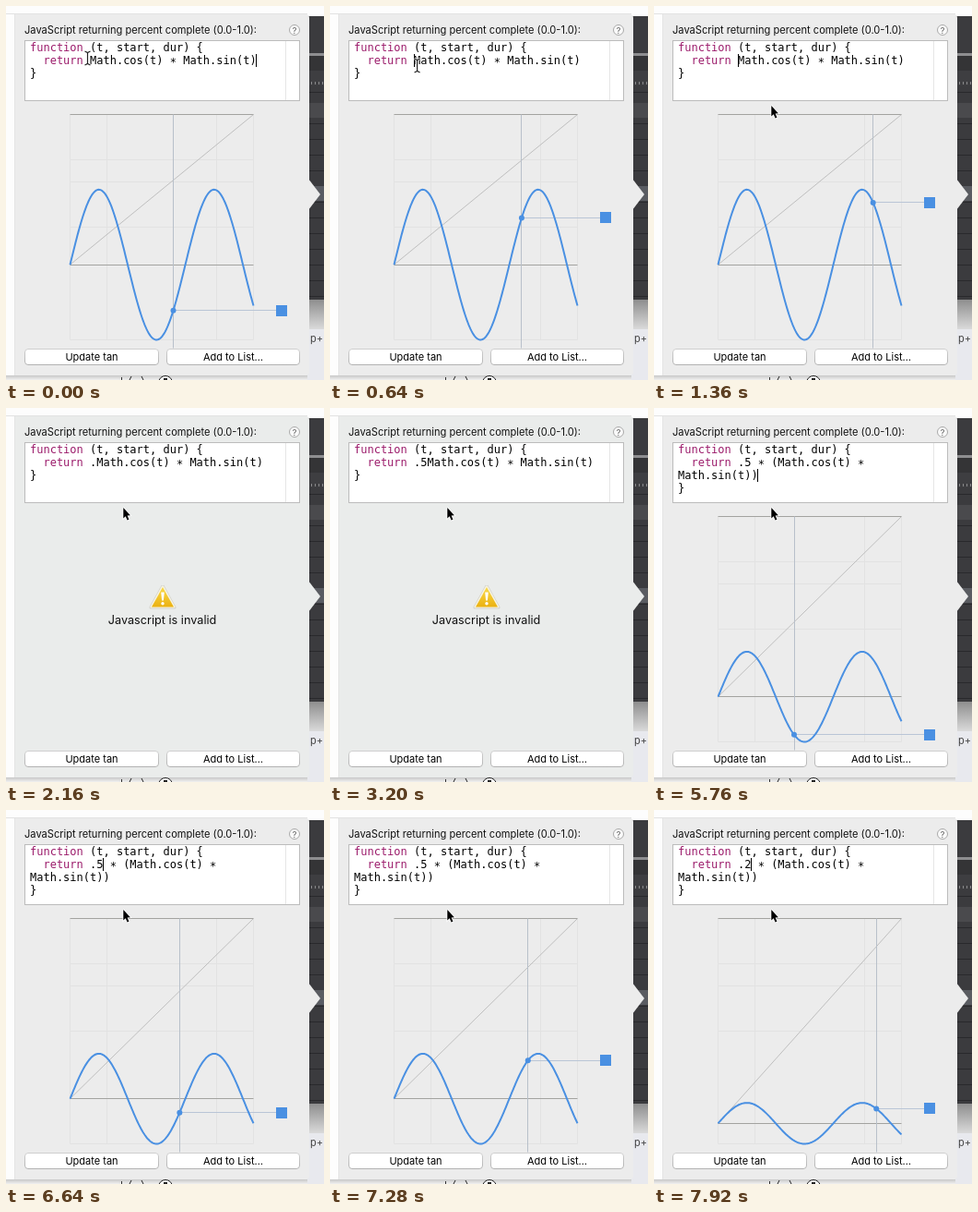
An HTML page with a canvas that plays this animation: 345x405 px, repeating every 8 s.

```html
<!DOCTYPE html>
<html lang="en">
<head>
<meta charset="utf-8">
<title>Easing editor</title>
<style>
html, body { margin: 0; width: 100%; height: 100%; overflow: hidden; background: #fff; }
canvas { display: block; width: 345px; height: 405px; }
</style>
</head>
<body>
<canvas id="stage"></canvas>
<script>
const LOOP = 8000, FRAME = 80;
const SANS = 'Inter, "Open Sans", sans-serif';
const MONO = '12px "DejaVu Sans Mono", monospace';
const BLUE = '#4a90e2', CHAR = 7.224;
const LEFT = 69.5, RIGHT = 268.5, TOP = 117.5, BOTTOM = 361.5;

const canvas = document.getElementById('stage');
const scale = window.devicePixelRatio || 1;
canvas.width = 345 * scale;
canvas.height = 405 * scale;
const g = canvas.getContext('2d');

// [start, factor, closing, caret index, amplitude (0 = invalid)]
const edits = [
  [0, '', '', 34, .5],
  [240, '', '', 9, .5],
  [1680, '.', '', 10, 0],
  [2720, '.5', '', 11, 0],
  [3440, '.5 ', '', 12, 0],
  [3680, '.5 *', '', 13, 0],
  [3840, '.5 * ', '', 14, 0],
  [4000, '.5 * (', '', 15, 0],
  [4080, '.5 * (', '', 15, 0],
  [4560, '.5 * (', '', 40, 0],
  [5360, '.5 * (', ')', 41, .25],
  [6160, '.5 * (', ')', 12, .25],
  [6320, '.5 * (', ')', 11, .25],
  [7440, '. * (', ')', 10, 0],
  [7520, '.2 * (', ')', 11, .1]
];

function rect(x, y, w, h, color) {
  g.fillStyle = color;
  g.fillRect(x, y, w, h);
}

function path(points, stroke, width = 1, fill) {
  g.beginPath();
  points.forEach(([x, y]) => g.lineTo(x, y));
  if (fill) { g.closePath(); g.fillStyle = fill; g.fill(); }
  if (stroke) { g.strokeStyle = stroke; g.lineWidth = width; g.stroke(); }
}

const line = (x1, y1, x2, y2, color, width) => path([[x1, y1], [x2, y2]], color, width);

function circle(x, y, r, fill, stroke) {
  g.beginPath();
  g.arc(x, y, r, 0, 7);
  if (fill) { g.fillStyle = fill; g.fill(); }
  if (stroke) { g.strokeStyle = stroke; g.lineWidth = 1; g.stroke(); }
}

function text(str, x, y, font, color = '#111', align = 'left') {
  g.font = font;
  g.fillStyle = color;
  g.textAlign = align;
  g.fillText(str, x, y);
}

function fade(y1, y2, from, to) {
  const grad = g.createLinearGradient(0, y1, 0, y2);
  grad.addColorStop(0, from);
  grad.addColorStop(1, to);
  return grad;
}

function button(label, x, w) {
  g.beginPath();
  g.roundRect(x + .5, 371.5, w - 1, 17, 3.5);
  g.fillStyle = '#fff';
  g.fill();
  g.strokeStyle = fade(371, 389, '#d0d0d0', '#b2b2b2');
  g.lineWidth = 1;
  g.stroke();
  text(label, x + w / 2, 384, '11px ' + SANS, '#000', 'center');
}

function drawBackdrop() {
  rect(0, 0, 345, 405, '#fdfdfd');
  // dark timeline window on the right
  rect(325, 11, 20, 308, '#3b3b3e');
  rect(325, 51, 20, 3, '#8e8e90');
  rect(325, 54, 20, 16, '#343436');
  rect(325, 70, 20, 16, '#3e3e41');
  for (let x = 331; x < 345; x += 4) rect(x, 82, 1, 3, '#8a8a8c');
  for (let y = 93; y < 318; y += 17) rect(325, y, 20, 1, '#29292c');
  rect(325, 105, 20, 16, '#4a4a4d');
  rect(325, 195, 20, 16, '#5a5c61');
  rect(325, 318, 20, 32, fade(318, 350, '#8e8e8e', '#dadada'));
  rect(325, 350, 20, 55, '#e8e9ee');
  text('p+', 330, 364, '11px ' + SANS, '#444');
  // scraps below the panel
  rect(0, 400, 327, 5, fade(400, 405, '#c8c8c8', '#f0f0f0'));
  rect(125, 402, 1, 3, '#333');
  line(136, 401, 134, 405, '#222');
  line(147, 401, 149, 405, '#222');
  circle(173, 408, 7.5, '#fff', '#222');
  rect(171, 403, 4, 2, '#222');
}

function drawPanel(color) {
  g.beginPath();
  g.roundRect(10, 9, 319, 391, [0, 4, 4, 0]);
  g.fillStyle = color;
  g.fill();
  rect(0, 8, 327, 1, '#e2e2e2');
  rect(9, 9, 1, 391, '#e4e4e4');
  path([[328, 187], [341, 204], [328, 221]], null, 1, color);
  text('JavaScript returning percent complete (0.0-1.0):', 20, 30, '11.1px ' + SANS);
  circle(313, 26, 5.5, '#fafafa', '#aaa');
  text('?', 313, 29.5, '9px ' + SANS, '#555', 'center');
  rect(20, 37, 299, 66, '#bcbcbc');
  rect(21, 38, 297, 64, '#fff');
  rect(303, 38, 1, 64, '#e6e6e6');
  button('Update tan', 20, 146);
  button('Add to List…', 174, 145);
}

// One row of code: keyword tinted, asterisks set at mid height
function codeRow(row, y) {
  const keyword = row.match(/function|return/);
  const end = keyword ? keyword.index + keyword[0].length : 0;
  text(row.slice(0, end), 26, y, MONO, '#9b1a6a');
  text(row.slice(end).replaceAll('*', ' '), 26 + end * CHAR, y, MONO, '#000');
  const star = row.indexOf('*');
  if (star >= 0) text('*', 26 + star * CHAR, y + 2, MONO, '#000');
  const second = row.indexOf('*', star + 1);
  if (second > star) text('*', 26 + second * CHAR, y + 2, MONO, '#000');
}

function drawCode(t, [start, factor, closing, caret]) {
  const body = '  return ' + factor + 'Math.cos(t) * Math.sin(t)' + closing;
  const split = body.length > 37 ? body.lastIndexOf(' ', 37) + 1 : body.length;
  const rows = ['function (t, start, dur) {', body.slice(0, split)];
  if (split < body.length) rows.push(body.slice(split));
  rows.push('}');
  rows.forEach((row, i) => codeRow(row, 49 + 14 * i));
  if ((t - start) % 1040 >= 480) return;
  const wrapped = caret >= split && split < body.length;
  const col = wrapped ? caret - split : caret;
  rect(Math.round(25.6 + col * CHAR), wrapped ? 66 : 52, 1, 14, '#000');
}

function drawGraph(t, amp) {
  const unit = (BOTTOM - TOP) / (1 + amp);
  const base = TOP + unit;
  const valueY = x => base - amp * unit * Math.sin(10 * (x - LEFT) / (RIGHT - LEFT));
  const axis = Math.floor(base) + .5;

  [LEFT, 109.5, 228.5, RIGHT].forEach(x => line(x, TOP, x, BOTTOM, '#e2e2e2'));
  [166.5, 190.5, 239.5, BOTTOM].forEach(y => line(LEFT, y, RIGHT, y, '#e2e2e2'));
  line(LEFT, TOP, RIGHT, TOP, '#a3a3a0');
  line(LEFT, axis, RIGHT, axis, '#a3a3a0');
  line(LEFT, base, RIGHT, TOP, '#bfbfbf');

  const sweep = t < 4000 ? 181.5 + .0413 * t : 152 + .0413 * (t - 5760);
  const y = valueY(sweep);
  const lineX = Math.floor(sweep) + .5, lineY = Math.floor(y) + .5;
  line(lineX, TOP, lineX, BOTTOM + 9, '#b8c0ca');
  line(sweep, lineY, 293, lineY, '#b9c5d6');

  const curve = [];
  for (let x = LEFT; x <= RIGHT; x++) curve.push([x, valueY(x)]);
  path(curve, BLUE, 2);
  circle(sweep, y, 3, BLUE);
  rect(293, Math.round(y) - 6, 12, 12, BLUE);
}

function drawWarning() {
  g.lineJoin = 'round';
  path([[170, 192.5], [183, 216], [157, 216], [170, 192.5]], '#d2d2cc', 3);
  path([[170, 193], [182.5, 215.5], [157.5, 215.5], [170, 193]], '#f8f4e0', 2);
  path([[170, 194], [182, 215.5], [158, 215.5]], null, 1, fade(193, 216, '#fbdc4c', '#eab010'));
  g.lineJoin = 'miter';
  path([[168.2, 199.5], [171.8, 199.5], [170.9, 208.5], [169.1, 208.5]], null, 1, '#fff');
  circle(170, 211.8, 1.7, '#fff');
  text('Javascript is invalid', 169.5, 234, '12.7px ' + SANS, '#111', 'center');
}

function drawPointer(t) {
  const k = Math.min(1, Math.max(0, (t - 480) / 640));
  const ease = k * k * (3 - 2 * k);
  const x = 88 + 39 * ease, y = 56 + 51 * ease;
  if (y < 103) {
    const beam = (color, width) => {
      line(x + .5, y - 6, x + .5, y + 7, color, width);
      path([[x - 2.5, y - 7], [x + .5, y - 5.5], [x + 3.5, y - 7]], color, width);
      path([[x - 2.5, y + 8], [x + .5, y + 6.5], [x + 3.5, y + 8]], color, width);
    };
    beam('#fff', 2.5);
    beam('#222', 1.2);
    return;
  }
  const arrow = [[0, 0], [0, 13.5], [3, 10.8], [5.2, 15.8], [7.5, 14.8], [5.3, 9.9], [9.3, 9.7]]
    .map(([dx, dy]) => [x + .3 + dx * .82, y + 1 + dy * .86]);
  path([...arrow, arrow[0]], '#fff', 1.6);
  path(arrow, null, 1, '#000');
}

function draw(now) {
  const t = Math.floor(now % LOOP / FRAME) * FRAME;
  const edit = edits.findLast(e => e[0] <= t);
  const amp = edit[4];
  g.setTransform(scale, 0, 0, scale, 0, 0);
  drawBackdrop();
  drawPanel(amp ? '#ececec' : '#eaeceb');
  drawCode(t, edit);
  if (amp) drawGraph(t, amp);
  else drawWarning();
  drawPointer(t);
}

let begin;
function tick(now) {
  begin ??= now;
  draw(now - begin);
  requestAnimationFrame(tick);
}
draw(0);
requestAnimationFrame(tick);
</script>
</body>
</html>
```
